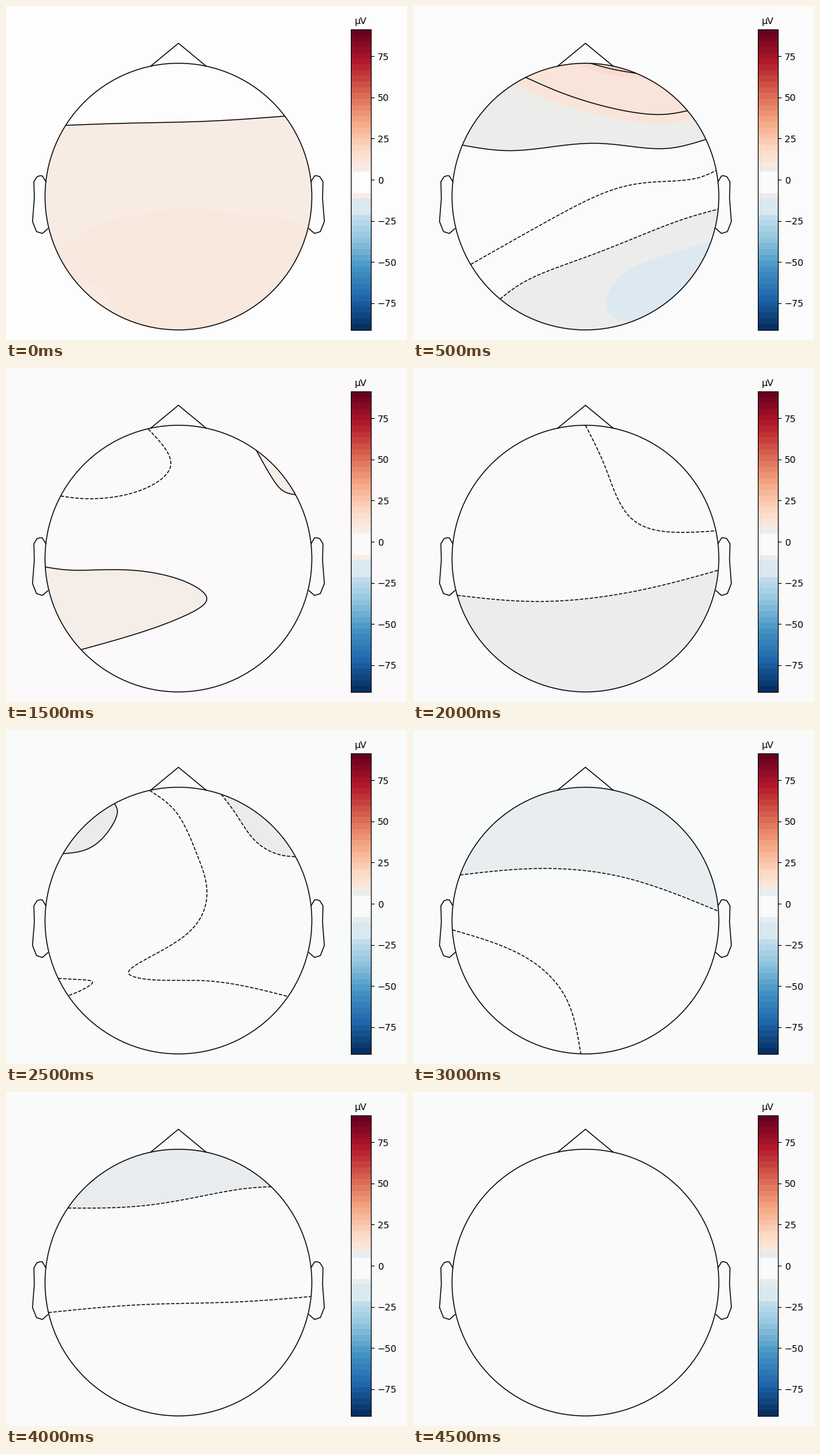
Recreate the animation shown at these times as a matplotlib script. Size 600 px wide and 500 px high, loop 5000 ms.

```python
import numpy as np
import matplotlib.pyplot as plt
from matplotlib.animation import FuncAnimation
from matplotlib.patches import Circle, Polygon, Rectangle

W, H, DPI = 600, 500, 100
CX, CY, R = 258, 285.3, 199.6
VMAX, BANDS = 91.35, 52

fig = plt.figure(figsize=(W / DPI, H / DPI), dpi=DPI)
ax = fig.add_axes([0, 0, 1, 1])
ax.set_xlim(0, W)
ax.set_ylim(H, 0)
ax.axis("off")
backdrop = ax.add_patch(Rectangle((0, 0), W, H, lw=0, zorder=0))
drawn = []


# ---------- geometry ----------
def rim(deg, scale=1):
    """Point on the head outline, clockwise from the nose."""
    a = np.radians(deg)
    return np.stack([CX + scale * R * np.sin(a),
                     CY - scale * R * np.cos(a)], axis=-1)


def spline(p, n=16):
    """Natural cubic spline through the points p."""
    h = np.hypot(*np.diff(p, axis=0).T) ** 0.7
    slope = np.diff(p, axis=0) / h[:, None]
    a, rhs = np.eye(len(p)), np.zeros_like(p)
    for i in range(1, len(p) - 1):
        a[i, i - 1:i + 2] = h[i - 1], 2 * (h[i - 1] + h[i]), h[i]
        rhs[i] = 6 * (slope[i] - slope[i - 1])
    m = np.linalg.solve(a, rhs)
    v = np.linspace(0, 1, n, endpoint=False)[:, None]
    u = 1 - v
    parts = [u * p[i] + v * p[i + 1]
             + h[i] ** 2 / 6 * ((u**3 - u) * m[i] + (v**3 - v) * m[i + 1])
             for i in range(len(h))]
    return np.vstack(parts + [p[-1:]])


def contour(start, end, *keys, style=None, fill=None):
    """Curve from rim angle to rim angle through a few key points.

    A fill covers the side lying along the rim between both angles.
    """
    inner = np.reshape(keys, (-1, 2)) + 0.5
    path = spline(np.vstack([rim(start), inner, rim(end)]))
    if fill:
        arc = rim(np.linspace(end, start, 60), 1.05)
        drawn.append(ax.add_patch(
            Polygon(np.vstack([path, arc]), fc=fill, lw=0, zorder=1)))
    if style:
        drawn.extend(ax.plot(*path.T, style, color="k", lw=1, zorder=2))
    for part in drawn:
        part.set_clip_path(head)


# ---------- head ----------
head = ax.add_patch(Circle((CX, CY), R, fc="none", ec="k", lw=1, zorder=3))
ear_x = np.array([.497, .510, .518, .5299, .5419, .54, .547, .532, .510, .489])
ear_y = np.array([.0555, .0775, .0783, .0746, .0555,
                  -.0055, -.0932, -.1313, -.1384, -.1199])
for side in (-1, 1):
    ax.plot(CX + side * 2 * R * ear_x, CY - 2 * R * ear_y, "k", lw=1, zorder=3)
nose = np.vstack([rim(-12), rim(0, 1.15), rim(12)])
ax.plot(*nose.T, "k", lw=1, zorder=3)

# ---------- colour bar ----------
cax = fig.add_axes([0.86, 0.03, 0.05, 0.9])
cax.set_ylim(-VMAX, VMAX)
cax.set_xticks([])
cax.yaxis.tick_right()
cax.set_yticks(range(-75, 76, 25))
cax.set_title("µV", fontsize=10)


def band(low, high, color):
    return cax.axhspan(low, high, fc=color, lw=0, antialiased=False)


cmap = plt.get_cmap("RdBu_r", BANDS)
levels = np.linspace(-VMAX, VMAX, BANDS + 1)
for k in range(BANDS):
    band(levels[k], levels[k + 1], cmap(k))
band(-21.5, -11.4, "#dae8f0")
lower, middle, upper = (band(-11.4, -8.1, "w"), band(-8.1, 4.9, "w"),
                        band(4.9, 8.9, "w"))


# ---------- scalp maps, one per time step ----------
def calm_start(tint):
    contour(302.3, 52.9, 180, 175, 300, 172, style="-", fill=tint)
    contour(245.4, 101.6, 130, 331, 260, 305.5, fill="#f8e8de")
    contour(231.6, 193.5, 143, 426, 165, 459, fill=tint)


def front_rise(tint):
    contour(-67.3, 64.6, 150, 216, 272, 205, 375, 213, style="-", fill=tint)
    contour(-32.8, 54.4, 240, 153, 375, 175, fill="#f9e4d9")
    contour(-3.7, 28.1, 290, 101, fill="#f9dccf")
    contour(-26.6, 49.9, 240, 136, 368, 162, style="-")
    contour(2.3, 22.4, 298, 94, style="-")
    contour(239.4, 78.7, 200, 322, 300, 274, 360, 263, 425, 257, style="--")
    contour(219.8, 95.4, 165, 413, 270, 371, 400, 320, style="--", fill=tint)
    contour(109.4, 161.4, 370, 375, 302, 412, 290, 455, fill="#dce9f1")


def split_sides(tint):
    contour(258.3, -7.5, 150, 310, 255, 268, 297, 222, 287, 138,
            style="-", fill=tint)
    contour(4, 158.4, 316, 150, 349, 270, 300, 312, 220, 367, 257, 395,
            285, 458, fill="#f8e6da")
    contour(9.5, 124.7, 313, 120, 345, 204, 379, 294, 351, 345, 380, 377,
            style="-")
    contour(27.9, 70.6, 375, 155, 405, 203, fill="#f9dccb")
    contour(30.5, 66.3, 382, 163, 410, 196, style="-")
    contour(-66.8, -20.9, 125, 205, 185, 172, 205, 130, style="--", fill=tint)
    contour(-56.5, -26.1, 140, 163, 176, 128, fill="#dae9ef")
    contour(-47.8, -30.1, 140, 137, 157, 120, style="--")
    contour(-82.1, -13.8, 120, 260, 205, 222, 249, 160, style="--")


def left_lobe(tint):
    contour(266.4, 226.9, 95, 302, 185, 302, 285, 328, 300, 345, 270, 369,
            style="-", fill=tint)
    contour(35.7, 61.4, 397, 163, 415, 184, style="-", fill=tint)
    contour(-62, -13.2, 115, 195, 205, 181, 246, 145, style="--")


def back_drift(tint):
    contour(254, 95, 190, 349, 340, 332, style="--", fill=tint)
    contour(0, 78, 288, 150, 330, 228, style="--")


def twin_patches(tint):
    contour(-59.9, -28.7, 125, 176, 158, 143, 166, 119, style="-", fill=tint)
    contour(18.7, 61.4, 344, 126, 373, 166, 408, 186, style="--", fill=tint)
    contour(-12.5, 124.7, 252, 120, 285, 185, 300, 238, 270, 305, 183, 364,
            205, 372, 300, 375, style="--")
    contour(244.3, 235.7, 108, 373, 129, 377, 120, 385, style="--")


def front_dip(tint):
    contour(-70, 86, 180, 207, 310, 219, style="--", fill=tint)
    contour(266, 182, 170, 341, 228, 400, style="--")


def front_pool(tint):
    contour(-65.7, 31.7, 140, 221, 290, 238, 337, 222, 357, 165,
            style="--", fill=tint)
    contour(-52.3, -8.8, 190, 173, 257, 157, 262, 110, fill="#dbe9f0")
    contour(-40.6, -19.3, 180, 135, 210, 117, style="--")
    contour(270, 149.5, 90, 299, 175, 317, 237, 354, 195, 393, 154, 421,
            210, 432, style="--")


def fading(tint):
    contour(-56, 44, 220, 168, 350, 145, style="--", fill=tint)
    contour(257, 96, 200, 318, 340, 314, style="--")


def flat(tint):
    pass


# map, background, tint next to zero
STEPS = [
    (calm_start, "#fdfdfd", "#f8ebe4"),
    (front_rise, "#fbfbfb", "#ecedeb"),
    (split_sides, "#fcfcfc", "#f6ebe6"),
    (left_lobe, "#fbf9fa", "#f5ede8"),
    (back_drift, "#fafafa", "#ebecec"),
    (twin_patches, "#f9fbfa", "#eaecec"),
    (front_dip, "#f9fafa", "#e8edef"),
    (front_pool, "#f9fafc", "#e4ecf1"),
    (fading, "#fafafa", "#e8ecee"),
    (flat, "#fafafa", "#e9eae9"),
]


def update(i):
    while drawn:
        drawn.pop().remove()
    scene, paper, tint = STEPS[i]
    for patch, color in ((backdrop, paper), (middle, paper),
                         (upper, tint), (lower, tint)):
        patch.set_facecolor(color)
    scene(tint)
    return drawn


anim = FuncAnimation(fig, update, frames=len(STEPS), interval=500,
                     init_func=lambda: update(0), repeat=True, blit=False)
plt.show()
```
